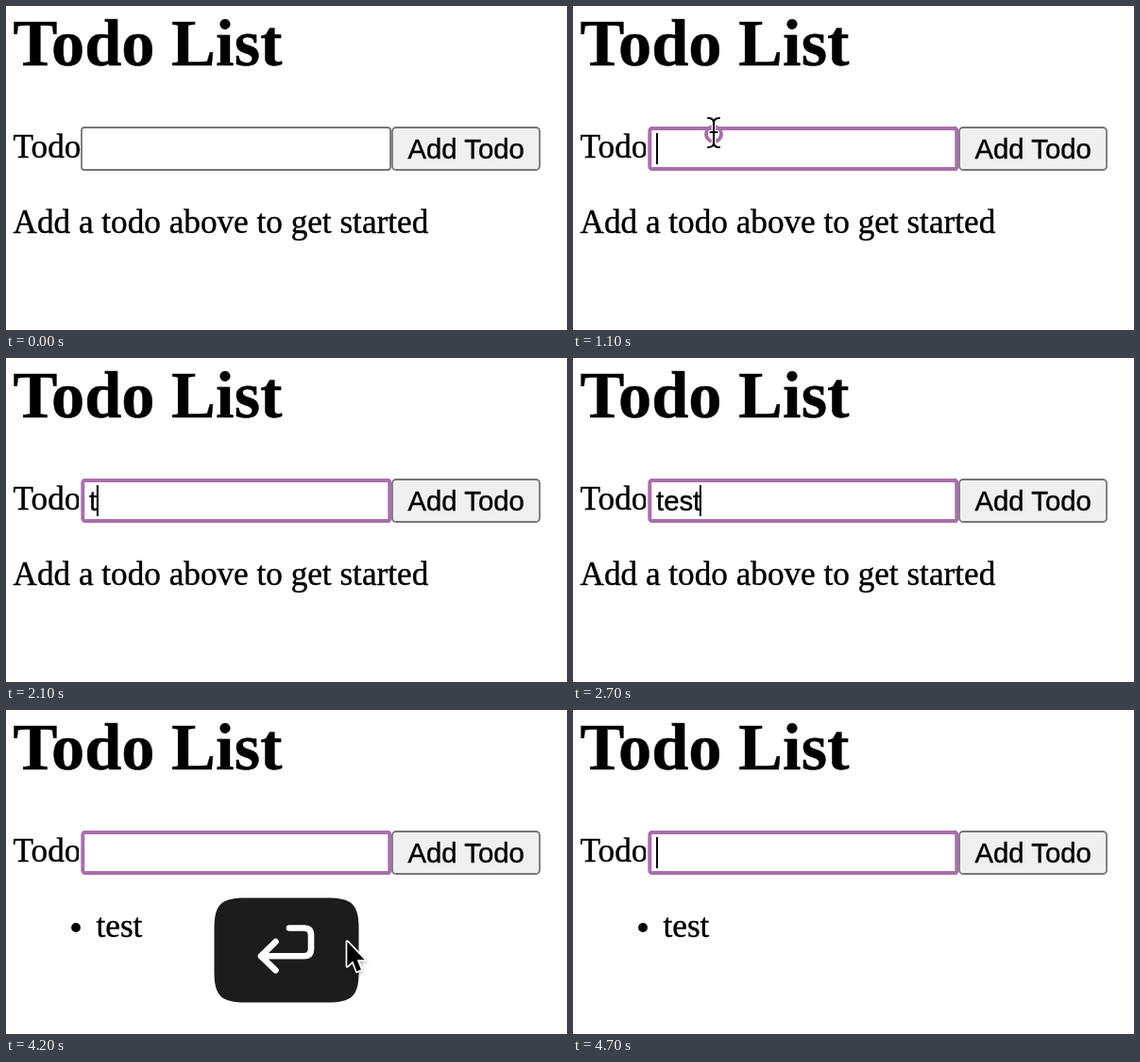
Recreate the animation shown at these times as an HTML page. Size 594x344 px, loop 5100 ms.

```html
<!DOCTYPE html>
<html lang="en">
<head>
<meta charset="utf-8">
<title>Todo List</title>
<style>
  html, body { margin: 0; width: 100%; height: 100%; overflow: hidden; background: #fff; }
  svg { display: block; width: 594px; height: 344px; }
  text { font: 35.2px "Liberation Serif", Times, serif; font-kerning: normal; stroke: #000; stroke-width: .4; }
  .title { font-size: 70.4px; font-weight: bold; }
  .ui { font: 29.33px "Liberation Sans", Arial, sans-serif; }
  .box { stroke: #767676; stroke-width: 1.8; }
  #arrow { paint-order: stroke; stroke: #fff; stroke-width: 3.4; stroke-linejoin: round;
    filter: drop-shadow(0 2px 2px rgba(0, 0, 0, .3)); }
</style>
</head>
<body>
<svg viewBox="0 0 594 344">
  <defs>
    <path id="bar" fill="none" stroke-linecap="round"
      d="M-6-15Q0-15 0-10Q0-15 6-15M0-10V11M-6 16Q0 16 0 11Q0 16 6 16M-3.5 0H3.5"/>
  </defs>

  <text class="title" x="7.5" y="63">Todo List</text>
  <text x="7.5" y="161">Todo</text>
  <rect class="box" x="80" y="129" width="327" height="45" rx="3" fill="#fff"/>
  <rect class="box" x="409" y="129" width="156" height="45" rx="4" fill="#efefef"/>
  <text class="ui" x="425.5" y="162">Add Todo</text>

  <g id="focus">
    <path d="M77 128h5v47h-5z" fill="#fff"/>
    <rect x="81.3" y="130" width="325" height="43" rx="2.5" fill="#fff" stroke="#aa6eac" stroke-width="4"/>
  </g>
  <text id="typed" class="ui" x="88" y="162"></text>
  <rect id="caret" y="135" width="2" height="33"/>

  <text id="hint" x="7.5" y="241">Add a todo above to get started</text>
  <g id="item">
    <circle cx="74" cy="231" r="4.9"/>
    <text x="95.5" y="241">test</text>
  </g>

  <g id="key">
    <path fill="#1c1c1c" d="M220.5 232C220.5 206 228 199.5 254 199.5H340C366 199.5 373.5 206 373.5 232V278C373.5 304 366 310.5 340 310.5H254C228 310.5 220.5 304 220.5 278Z"/>
    <path fill="none" stroke="#fff" stroke-width="6.6" stroke-linecap="round" stroke-linejoin="round"
      d="M300 231.5H315.5Q323 231.5 323 239V253.5Q323 261.3 315.5 261.3H270M285.5 246L270 261.3L285.5 276.3"/>
  </g>

  <circle id="ring" cx="149" cy="136" fill="none" stroke="#aa6eac" stroke-width="4"/>
  <path id="arrow" d="M0 0V26L6 20.6L10.2 31.4L14.6 29.6L10.4 19.2H18.4Z"/>
  <g id="beam">
    <use href="#bar" stroke="#fff" stroke-width="4.6"/>
    <use href="#bar" stroke="#000" stroke-width="2.1"/>
  </g>
</svg>
<script>
const LOOP = 5100, STEP = 100;
const FOCUS = 1100, BLINK = 500;
const TYPE = 2100, KEY_GAP = 200, WORD = 'test';
const SUBMIT = 3100, KEY_FADE = 4200;
const REST = { x: 149, y: 134 };

const $ = id => document.getElementById(id);
const show = (id, alpha) => $(id).setAttribute('opacity', Number(alpha));
const part = (t, start, length) => Math.min(1, Math.max(0, (t - start) / length));

// The pointer brakes in a curve towards the input, then speeds away downwards.
function pointerAt(t) {
  const left = 1 - part(t, 400, 500), gone = part(t, 3600, 900);
  return {
    x: REST.x + 199 * left ** 2 + 390 * gone ** 1.5,
    y: REST.y + 208 * left ** 3 + 252 * gone ** 2
  };
}

function drawPointer(t) {
  const { x, y } = pointerAt(t);
  const visible = (t >= 400 && t < TYPE) || (t >= 3700 && t < 4500);
  const overInput = y < 174;
  for (const id of ['arrow', 'beam']) $(id).setAttribute('transform', `translate(${x} ${y})`);
  show('arrow', visible && !overInput);
  show('beam', visible && overInput);
}

function drawInput(t) {
  const pressed = Math.min(WORD.length, Math.floor((t - TYPE) / KEY_GAP) + 1);
  const typing = t >= TYPE && t < SUBMIT;
  $('typed').textContent = typing ? WORD.slice(0, pressed) : '';
  $('caret').setAttribute('x', 88 + $('typed').getComputedTextLength() * .97);

  // Every key press restarts the blink.
  const restart = t < TYPE ? FOCUS : TYPE + (pressed - 1) * KEY_GAP;
  show('caret', t >= FOCUS && Math.floor((t - restart) / BLINK) % 2 === 0);
  show('focus', t >= FOCUS);
}

function drawRing(t) {
  const grown = part(t, FOCUS, 500);
  $('ring').setAttribute('r', 8 + 120 * grown);
  show('ring', t >= FOCUS ? 1 - grown : 0);
}

function draw(t) {
  drawInput(t);
  drawRing(t);
  drawPointer(t);
  show('hint', t < SUBMIT);
  show('item', t >= SUBMIT);
  show('key', t >= SUBMIT ? 1 - part(t, KEY_FADE, 300) : 0);
}

function tick() {
  const t = performance.now() % LOOP;
  draw(Math.floor(t / STEP) * STEP);
  requestAnimationFrame(tick);
}
tick();
</script>
</body>
</html>
```
